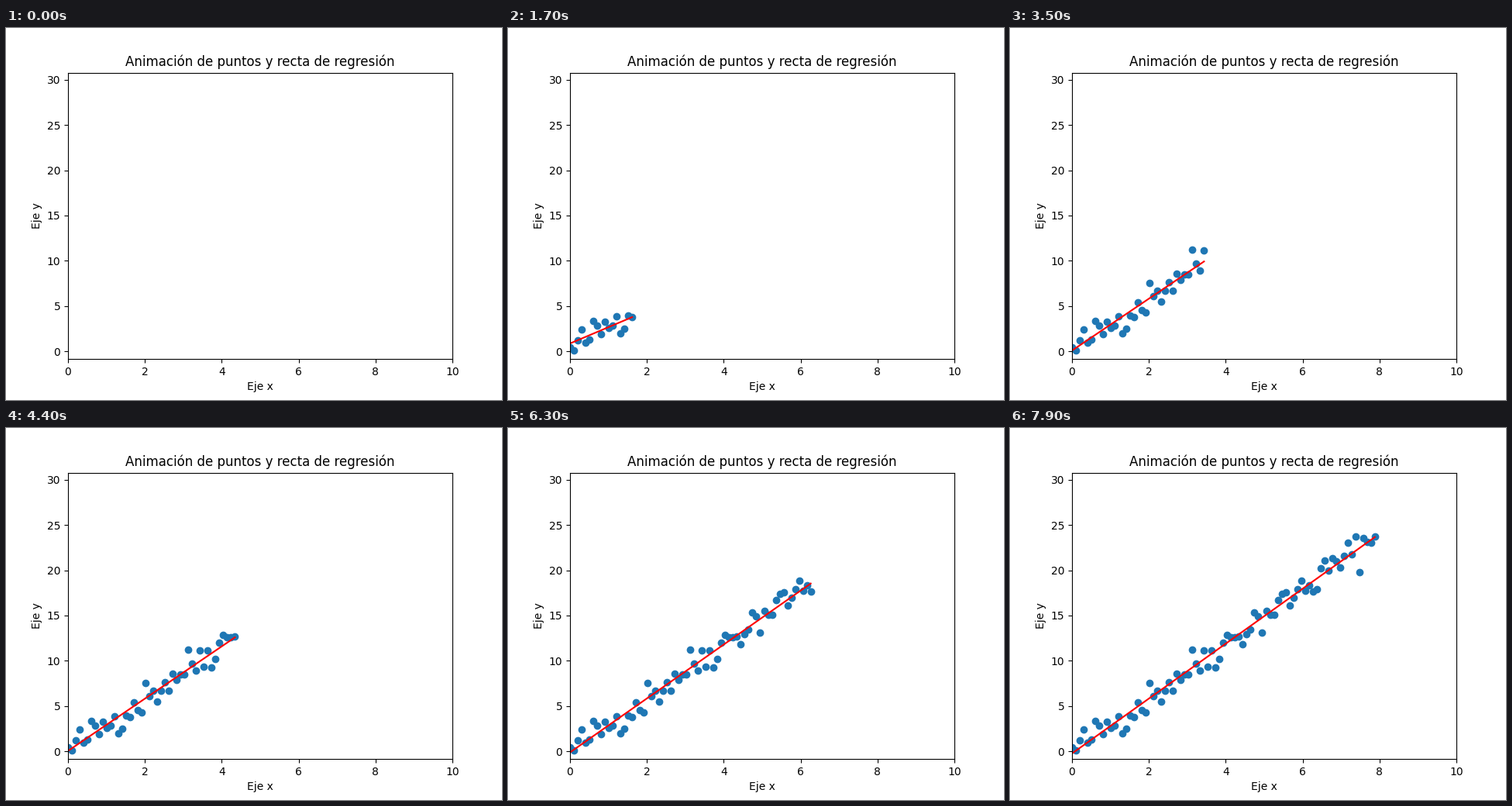
These frames come from a looping animation (640x480 px, 8000 ms). A matplotlib script:

```python
import numpy as np
import matplotlib.pyplot as plt
from matplotlib.animation import FuncAnimation

FRAMES = 80
INTERVAL = 100  # ms

# Noisy samples around y = 3x
np.random.seed(42)
x = np.linspace(0, 10, 100)
y = 3 * x + np.random.randn(100)

plt.rcParams["font.family"] = "DejaVu Sans"
fig, ax = plt.subplots(figsize=(6.4, 4.8), dpi=100)
ax.set_xlim(0, 10)
ax.set_ylim(y.min() - 1, y.max() + 1)
ax.set_title("Animación de puntos y recta de regresión")
ax.set_xlabel("Eje x")
ax.set_ylabel("Eje y")

points = ax.scatter([], [], color="tab:blue")
line, = ax.plot([], [], color="red")


def update(n):
    """Show the first n points and the least-squares line through them."""
    xs, ys = x[:n], y[:n]
    points.set_offsets(np.column_stack((xs, ys)))
    if n > 1:
        slope, intercept = np.polyfit(xs, ys, 1)
        line.set_data(xs, slope * xs + intercept)
    else:
        line.set_data([], [])
    return points, line


anim = FuncAnimation(fig, update, frames=FRAMES, interval=INTERVAL,
                     init_func=lambda: update(0), repeat=True, repeat_delay=0)

plt.show()
```
